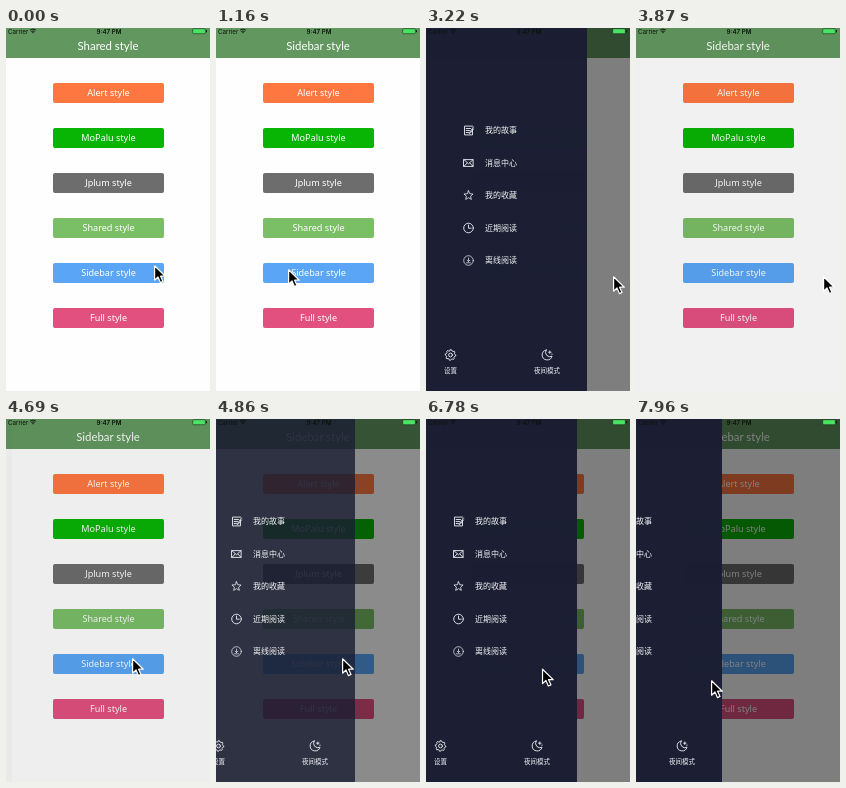
Write an HTML page that moves like this. It is 204 px wide and 363 px high and loops after 8000 ms.

```html
<!DOCTYPE html>
<html lang="zh">
<head>
<meta charset="utf-8">
<title>Sidebar style</title>
<style>
  html, body { margin: 0; width: 100%; height: 100%; overflow: hidden; background: #fefefe; }
  svg { display: block; width: 204px; height: 363px; }
  .title { font: 11.4px Lato, sans-serif; fill: #fff; text-anchor: middle; }
  .btn { font: 9.1px "Noto Sans", sans-serif; fill: #fff; text-anchor: middle; }
  .item { font: 8px "Noto Sans CJK SC", "Noto Sans CJK", sans-serif; fill: #f4f4f6; }
  .foot { font: 6.5px "Noto Sans CJK SC", "Noto Sans CJK", sans-serif; fill: #f4f4f6; text-anchor: middle; }
  .bar { font: 6.2px Inter, sans-serif; fill: #0c120c; }
  .icon { fill: none; stroke: #eeeef2; stroke-width: .9; stroke-linejoin: round; stroke-linecap: round; }
</style>
</head>
<body>
<svg viewBox="0 0 204 363" xmlns="http://www.w3.org/2000/svg">
  <rect width="204" height="363" fill="#fefefe"/>
  <rect width="204" height="30" fill="#629860"/>
  <text id="title" class="title" x="102" y="22.3"></text>
  <g id="buttons"></g>
  <rect id="dim" width="204" height="363"/>

  <g id="panel">
    <rect id="back" width="161" height="363" fill="#1b1e33"/>
    <g id="items"></g>
    <g class="icon" transform="translate(24.5 327)">
      <path id="gear"/>
      <circle r="1.9"/>
    </g>
    <text class="foot" x="24.5" y="344.6">设置</text>
    <g class="icon" transform="translate(121 327)">
      <path d="M-.8-5A5 5 0 1 0 5 1.2A4.4 4.4 0 0 1-.8-5Z"/>
      <path d="M2.8-4v2.4M1.6-2.8h2.4M4.8-.8h.4"/>
    </g>
    <text class="foot" x="121" y="344.6">夜间模式</text>
  </g>

  <g class="bar">
    <text x="2" y="5.6">Carrier</text>
    <g fill="none" stroke="#0c120c" stroke-width=".9">
      <path d="M24 2.2q3-2.4 6 0M25.3 3.6q1.7-1.3 3.4 0"/>
      <circle cx="27" cy="4.8" r=".3"/>
    </g>
    <text x="103" y="5.6" text-anchor="middle" font-weight="600">9:47 PM</text>
    <rect x="186.7" y=".7" width="12.6" height="5" rx="1" fill="#4be364" stroke="#0c120c" stroke-width=".5"/>
    <rect x="200" y="2.2" width="1" height="2" fill="#0c120c"/>
  </g>

  <path id="cursor" d="M.6.8V15.2L4 12L6.4 17.6L9 16.4L6.6 11.2H11.3Z"
        fill="#000" stroke="#fff" stroke-width="1.2" stroke-linejoin="round"/>
</svg>
<script>
const LOOP = 8000, WIDTH = 161;
const $ = id => document.getElementById(id);

const buttons = [
  ["Alert", "#ff7740"], ["MoPalu", "#08b404"], ["Jplum", "#6d6d6d"],
  ["Shared", "#7abe66"], ["Sidebar", "#5aa5f5"], ["Full", "#e25080"]
];
$("buttons").innerHTML = buttons.map(([name, color], i) => {
  const y = 55 + 45 * i;
  return `<rect x="47" y="${y}" width="111" height="20" rx="2" fill="${color}"/>
    <text class="btn" x="102.5" y="${y + 12.9}">${name} style</text>`;
}).join("");

// Closed outline alternating between two radii
function ring(n, outer, inner, group = 1) {
  const pts = [];
  for (let i = 0; i < n; i++) {
    const a = i * 2 * Math.PI / n - Math.PI / 2;
    const r = Math.floor(i / group) % 2 ? inner : outer;
    pts.push((r * Math.cos(a)).toFixed(2) + " " + (r * Math.sin(a)).toFixed(2));
  }
  return "M" + pts.join("L") + "Z";
}
$("gear").setAttribute("d", ring(32, 5.3, 4.2, 2));

const disc = '<circle r="4.8"/>';
const items = [
  ["我的故事", '<path d="M4-1V4.4H-4V-4.4H4M-2.3-2H2M-2.3 0H1M-2.3 2H0M5-3.6L1.4 1.6L.6 3L2.2 2.2L5-1.6"/>'],
  ["消息中心", '<path d="M-4.6-3.4H4.6V3.4H-4.6ZL0 .8L4.6-3.4M-4.6 3.4L-1.4 0M4.6 3.4L1.4 0"/>'],
  ["我的收藏", `<path stroke-width=".8" d="${ring(10, 4.8, 2.2)}"/>`],
  ["近期阅读", disc + '<path d="M0-3V.2H2.6"/>'],
  ["离线阅读", `<g stroke-width=".7">${disc}<path d="M0-2.4V1M-1.3-.3L0 1L1.3-.3M-2 2.3H2"/></g>`]
];
$("items").innerHTML = items.map(([name, art], i) => {
  const y = 102.5 + 32.5 * i;
  return `<g class="icon" transform="translate(42.5 ${y})">${art}</g>
    <text class="item" x="59" y="${y + 2.9}">${name}</text>`;
}).join("");

// Pointer moves: start, end, x, y
const moves = [
  [0, 630, 73, 242], [800, 860, 72, 241], [1990, 2270, 127, 252], [2510, 2810, 192, 251],
  [3060, 3220, 187, 248], [3880, 4280, 126, 239], [5290, 5510, 134, 246],
  [5700, 6060, 66, 256], [6060, 6370, 113, 250], [6560, 7370, 129, 247],
  [7380, 7720, 51, 243], [7850, 7960, 75, 261]
];

function ease(t, from, to) {
  const u = Math.min(1, Math.max(0, (t - from) / (to - from)));
  return u * u * (3 - 2 * u);
}

function pointer(t) {
  let x = 148, y = 237;
  for (const [from, to, toX, toY] of moves) {
    const k = ease(t, from, to);
    x += (toX - x) * k;
    y += (toY - y) * k;
  }
  return [x, y];
}

// How far the panel is open, 0 to 1
const opened = t => ease(t, 1345, 1525) - ease(t, 3640, 3895) + ease(t, 4662, 4922);

// The panel follows the pointer leftwards while it is dragged
const drag = t => t < 5700 ? 0 : Math.min(0, pointer(Math.min(t, 7720))[0] - 126);

function draw(t) {
  const [x, y] = pointer(t);
  const p = Math.max(0, opened(t));
  const shift = Math.round(WIDTH * (p - 1) + drag(t));
  $("title").textContent = (t < 1160 ? "Shared" : "Sidebar") + " style";
  $("dim").setAttribute("opacity", .5 * p ** .62);
  $("back").setAttribute("opacity", .98 * p ** 1.25);
  $("panel").setAttribute("transform", `translate(${shift} 0)`);
  $("cursor").setAttribute("transform", `translate(${x} ${y})`);
}

const start = performance.now();
function tick(now) {
  draw(Math.max(0, now - start) % LOOP);
  requestAnimationFrame(tick);
}
draw(0);
requestAnimationFrame(tick);
</script>
</body>
</html>
```
